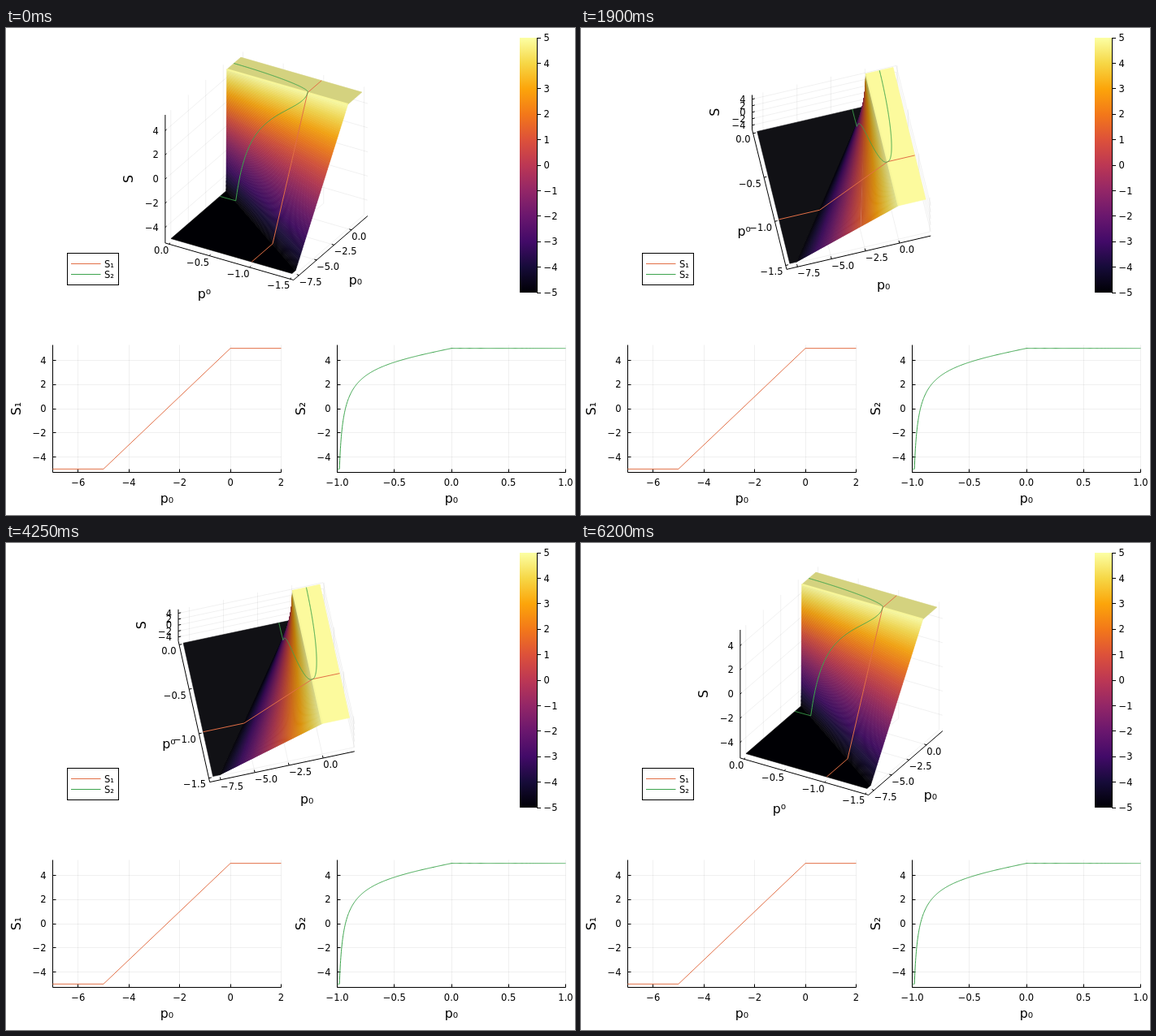
Recreate the animation shown at these times as an HTML page with a canvas. Size 700 by 600 pixels, loop 7500 ms.

```html
<!DOCTYPE html>
<html lang="en">
<head>
<meta charset="utf-8">
<title>Surface with rotating camera</title>
<style>
html, body { margin: 0; width: 100%; height: 100%; overflow: hidden; background: #fff; }
canvas { display: block; }
</style>
</head>
<body>
<canvas id="stage" width="700" height="600"></canvas>
<script>
const ctx = document.getElementById('stage').getContext('2d');
const RED = '#e26f46', GREEN = '#3da44d', GRID = 'rgba(0,0,0,0.06)';
const TICK = 11.5, LABEL = 15.8;
const STEP = 50, LAST = 49, LOOP = 7500;
const INFERNO = [[0, 0, 4], [22, 11, 57], [66, 10, 104], [106, 23, 110], [147, 38, 103], [188, 55, 84],
  [221, 81, 58], [243, 120, 25], [252, 165, 10], [246, 215, 70], [252, 255, 164]];

const clamp = (v, lo, hi) => Math.min(hi, Math.max(lo, v));
const minus = s => String(s).replace('-', '\u2212');
const range = (a, b, n) => Array.from({ length: n + 1 }, (_, i) => a + (b - a) * i / n);

function inferno(u) {
  const i = Math.min(9, Math.floor(u * 10)), f = u * 10 - i;
  return INFERNO[i].map((c, k) => c + (INFERNO[i + 1][k] - c) * f);
}
const rgb = c => `rgb(${c.map(v => Math.round(clamp(v, 0, 255)))})`;

// Diffuse light plus a soft highlight; facing is the cosine between normal and view.
function shade(u, facing) {
  const d = Math.max(0, facing), spec = 20 * d ** 6;
  return rgb(inferno(u).map(c => c * (0.68 + 0.33 * d) + spec * (1 - c / 255)));
}

function path(points, color, width = 1) {
  ctx.beginPath();
  points.forEach(p => ctx.lineTo(p[0], p[1]));
  ctx.strokeStyle = color;
  ctx.lineWidth = width;
  ctx.stroke();
}

function polygon(points, fill) {
  ctx.beginPath();
  points.forEach(p => ctx.lineTo(p[0], p[1]));
  ctx.closePath();
  ctx.fillStyle = ctx.strokeStyle = fill;
  ctx.lineWidth = 0.6;
  ctx.fill();
  ctx.stroke();
}

function text(s, x, y, align = 'center', size = TICK, turned = false) {
  ctx.save();
  ctx.translate(x, y);
  if (turned) ctx.rotate(-Math.PI / 2);
  ctx.font = `${size}px "DejaVu Sans", sans-serif`;
  ctx.textAlign = align;
  ctx.fillStyle = '#000';
  ctx.fillText(s, 0, size * 0.365);
  ctx.restore();
}

const circle = range(0, Math.PI, 400).map(a => {
  const p = -Math.cos(a), q = -Math.sin(a);
  return [p, q, p > 0 ? 5 : clamp(5 - 2 * p / q, -5, 5)];
});
const slice = [[-8, -1, -5], [-5, -1, -5], [0, -1, 5], [2, -1, 5]];
const zTicks = [-4, -2, 0, 2, 4];

function drawPanel(left, lo, hi, ticks, digits, label, curve, color) {
  const right = left + 281, top = 390.5, bottom = 547.5;
  const X = v => left + (v - lo) / (hi - lo) * 281, Y = v => 469 - v * 14.87;
  const crisp = v => Math.floor(v) + 0.5;
  for (const t of ticks) {
    const x = crisp(X(t));
    path([[x, top], [x, bottom]], GRID);
    path([[x, bottom], [x, bottom - 4]], '#000');
    text(minus(t.toFixed(digits)), X(t), 560);
  }
  for (const t of zTicks) {
    const y = crisp(Y(t));
    path([[left, y], [right, y]], GRID);
    path([[left, y], [left + 4, y]], '#000');
    text(minus(t), left - 8, Y(t), 'right');
  }
  path([[left, top], [left, bottom], [right, bottom]], '#000');
  ctx.save();
  ctx.beginPath();
  ctx.rect(left, top, 281.5, 158);
  ctx.clip();
  path(curve.map(p => [X(p[0]), Y(p[2])]), color);
  ctx.restore();
  text('p\u2080', left + 140.5, 579.5, 'center', LABEL);
  text(label, left - 45.5, 469, 'center', LABEL, true);
}

function drawColorbar() {
  const g = ctx.createLinearGradient(0, 326, 0, 12);
  range(0, 1, 10).forEach(u => g.addColorStop(u, rgb(inferno(u))));
  ctx.fillStyle = g;
  ctx.fillRect(632, 12, 21, 314);
  path([[653.5, 12], [653.5, 326]], '#000');
  for (let v = -5; v <= 5; v++) {
    const y = 169 - v * 31.4;
    path([[653, Math.floor(y) + 0.5], [658, Math.floor(y) + 0.5]], '#000');
    text(minus(v), 661.5, y, 'left');
  }
}

function drawLegend() {
  ctx.strokeStyle = '#000';
  ctx.lineWidth = 1;
  ctx.strokeRect(75.5, 277.5, 63, 39);
  path([[80, 290.5], [116.5, 290.5]], RED);
  path([[80, 303.5], [116.5, 303.5]], GREEN);
  text('S\u2081', 121, 290.5, 'left');
  text('S\u2082', 121, 303.5, 'left');
}

function drawSurface(state) {
  const u = state / LAST, flat = state === LAST;
  const az = (1 - u) * Math.PI / 3, el = Math.PI / 6 + u * Math.PI / 3;
  const sa = Math.sin(az), ca = Math.cos(az), se = Math.sin(el), ce = Math.cos(el);
  const size = 182.3;
  // Unit cube centred on the origin to the screen.
  const cube = (x, y, z) => [
    320.4 + size * (x * ca - y * sa),
    169.3 - size * ((x * sa + y * ca) * se + z * ce)];
  const nx = p => (p + 3) / 10.6, ny = q => (q + 0.75) / 1.59, nz = s => s / 10.6;
  const at = (p, q, s) => cube(nx(p), ny(q), nz(s));
  const h = 0.5, tick = -h + 0.018;

  const xs = [-7.5, -5, -2.5, 0], ys = [-1.5, -1, -0.5, 0];
  for (const x of xs.map(nx)) path([cube(x, -h, -h), cube(x, h, -h), cube(x, h, h)], GRID);
  for (const y of ys.map(ny)) path([cube(-h, y, -h), cube(h, y, -h), cube(h, y, h)], GRID);
  for (const z of zTicks.map(nz)) path([cube(-h, h, z), cube(h, h, z), cube(h, -h, z)], GRID);

  path([cube(h, -h, -h), cube(-h, -h, -h), cube(-h, h, -h)], '#000');
  for (const v of xs) {
    const p = cube(nx(v), -h, -h);
    path([p, cube(nx(v), tick, -h)], '#000');
    text(minus(v.toFixed(1)), p[0], p[1] + (flat ? 15 : 8), flat ? 'center' : 'left');
  }
  for (const v of ys) {
    const p = cube(-h, ny(v), -h);
    path([p, cube(tick, ny(v), -h)], '#000');
    text(minus(v.toFixed(1)), p[0] - 7 * u ** 3, p[1] + (flat ? 0 : 8 - 2 * u ** 4), 'right');
  }
  if (!flat) {
    path([cube(-h, h, -h), cube(-h, h, h)], '#000');
    for (const v of zTicks) {
      const p = cube(-h, h, nz(v));
      path([p, cube(tick, h, nz(v))], '#000');
      text(minus(v), p[0] - 8, p[1], 'right');
    }
    const mid = cube(-h, h, 0);
    text('S', mid[0] - 46, mid[1], 'center', LABEL, true);
  }
  const mx = cube(0, -h, -h), my = cube(-h, 0, -h);
  text('p\u2080', mx[0] + 30.5, mx[1] + 39.5, 'center', LABEL);
  text('p\u2070', my[0] - 31, my[1] + 39.5, 'center', LABEL);

  // Seen from above, painting from low to high hides the right parts.
  polygon([at(-8, 0, -5), at(-0.1, 0, -5), at(-7.5, -1.5, -5), at(-8, -1.5, -5)], shade(0, se));
  const facing = (t, q) => {
    const a = -2 / q, b = 0.3 * t / q;
    return (-a * sa * ce - b * ca * ce + se) / Math.hypot(a, b, 1);
  };
  const strips = 120;
  for (let i = strips; i > 0; i--) {
    const t0 = 5 * i / strips, t1 = 5 * (i - 1) / strips, t = (t0 + t1) / 2;
    const back = k => at(-0.02 * k, 0, 5 - 2 * k), front = k => at(-1.5 * k, -1.5, 5 - 2 * k);
    const g = ctx.createLinearGradient(...back(t), ...front(t));
    for (const f of [0.06, 0.3, 1]) g.addColorStop(f, shade(1 - t / 5, facing(t, 1.5 * f)));
    polygon([back(t0), front(t0), front(t1), back(t1)], g);
  }
  polygon([at(0, 0, 5), at(2, 0, 5), at(2, -1.5, 5), at(0, -1.5, 5)], shade(0.985, se));
  path([at(0, 0, 5), at(0, -1.5, 5)], shade(0.985, 0.93), 2);

  path(slice.map(p => at(...p)), RED);
  path(circle.map(p => at(...p)), GREEN);
}

function draw(state) {
  ctx.fillStyle = '#fff';
  ctx.fillRect(0, 0, 700, 600);
  drawSurface(state);
  drawColorbar();
  drawLegend();
  drawPanel(57.5, -7, 2, [-6, -4, -2, 0, 2], 0, 'S\u2081', slice, RED);
  drawPanel(407.5, -1, 1, [-1, -0.5, 0, 0.5, 1], 1, 'S\u2082', circle, GREEN);
}

let shown = -1;
const start = performance.now();
function tickFrame() {
  const n = Math.floor((performance.now() - start) % LOOP / STEP);
  const state = clamp(Math.min(n, 124 - n), 0, LAST);
  if (state !== shown) draw(shown = state);
  requestAnimationFrame(tickFrame);
}
tickFrame();
</script>
</body>
</html>
```
